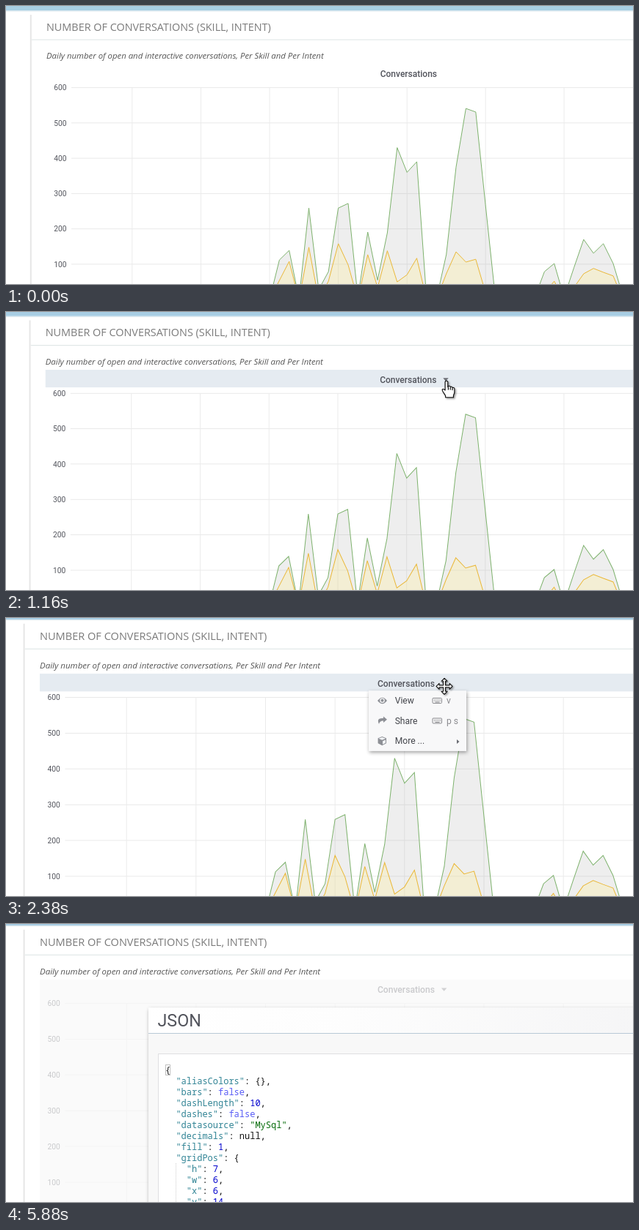
An HTML page for the animation above (5.94 s loop, 854x380 px).

```html
<!DOCTYPE html>
<html lang="en">
<head>
<meta charset="utf-8">
<title>Conversations panel</title>
<style>
html, body { margin: 0; width: 100%; height: 100%; overflow: hidden; background: #fff; }
svg { display: block; width: 100vw; height: 100vh; }
text { font-family: Roboto, sans-serif; fill: #52545c; }
.title { font: 14.4px "Open Sans", sans-serif; fill: #7b7b7b; }
.sub { font: italic 11.39px "Open Sans", sans-serif; fill: #555; }
.head { font-size: 12px; font-weight: 500; }
.axis { font-size: 10.2px; text-anchor: end; }
.tip text { font-size: 11.2px; }
.tip .strong { font-weight: 700; fill: #45474f; }
.item { font-size: 12.1px; fill: #43454b; }
.hint { font-size: 12.1px; fill: #8a8a8e; }
.code { font: 12px "Noto Sans Mono", monospace; fill: #111; }
.key { fill: #318495; }
.num { fill: #0000cd; }
.bool { fill: #585cf6; }
.str { fill: #036a07; }
.cursor { fill: #fff; stroke: #111; stroke-width: 1.1; stroke-linejoin: round; }
</style>
</head>
<body>
<svg id="stage" viewBox="0 0 854 380" preserveAspectRatio="none"></svg>
<script>
const LOOP = 5940;
const DAY = 13.37, X0 = 359, Y0 = 401.2, UNIT = 0.4827;
const GREEN = '#7eb26d', YELLOW = '#eab839', HOT = '#e5ebf1';
const total = [0, 112, 139, 2, 259, 28, 79, 259, 272, 6, 191, 55, 189, 430, 360, 390, 2, 2, 127,
  375, 541, 531, 268, 6, 4, 3, 2, 5, 79, 102, 6, 90, 170, 131, 158, 102, 10, 0];
const active = [0, 54, 108, 0, 148, 0, 52, 158, 98, 0, 127, 34, 138, 50, 70, 117, 0, 0, 73,
  135, 106, 114, 20, 0, 0, 0, 0, 0, 18, 52, 0, 34, 73, 88, 77, 67, 0, 0];

const px = i => X0 + i * DAY;
const py = v => Y0 - v * UNIT;
const rect = (x, y, w, h, fill, more = '') =>
  `<rect x="${x}" y="${y}" width="${w}" height="${h}" fill="${fill}" ${more}/>`;
const text = (x, y, cls, str, more = '') => `<text x="${x}" y="${y}" class="${cls}" ${more}>${str}</text>`;
const line = (x1, y1, x2, y2, stroke, more = '') =>
  `<path d="M${x1} ${y1}L${x2} ${y2}" stroke="${stroke}" fill="none" ${more}/>`;

function series(data, stroke, fill) {
  const pts = data.map((v, i) => px(i).toFixed(1) + ' ' + py(v).toFixed(1)).join('L');
  return `<path d="M${pts}V420H${X0}Z" fill="${fill}"/>` +
    `<path d="M${pts}" fill="none" stroke="${stroke}"/>`;
}

function grid() {
  let out = '';
  for (let v = 100; v <= 600; v += 100) {
    out += line(89, py(v), 870, py(v), '#e9e9e9') + text(82.5, py(v) + 3.7, 'axis', v);
  }
  for (const day of [-14, -7, 0, 7, 14, 22, 30]) out += line(px(day), 111.5, px(day), 420, '#ebebeb');
  return out;
}

const page = () =>
  rect(-10, -10, 890, 16.3, '#a8cee4') + rect(-10, 6.3, 890, 1.2, '#dbe8ee') +
  rect(32.8, 12, 2, 400, '#e6e6e6') + rect(35, 45.6, 840, 1, '#dce4e4') +
  text(55, 33.7, 'title', 'NUMBER OF CONVERSATIONS (SKILL, INTENT)') +
  text(55, 72.4, 'sub', 'Daily number of open and interactive conversations, Per Skill and Per Intent') +
  rect(55, 79.5, 830, 24, HOT, 'id="bar"') +
  text(509.7, 97, 'head', 'Conversations') +
  '<path id="caret" d="M595.7 90.8h7.4l-3.7 4.2z" fill="#6b6d74"/>' +
  grid() + series(total, GREEN, 'rgba(120,120,120,.125)') + series(active, YELLOW, 'rgba(252,236,160,.34)');

const hover = () => `<g id="hover">
  <path id="rule" d="M0 111V420" stroke="#c0504a" stroke-opacity=".8" stroke-width="1.5"/>
  <circle id="dotA" r="4.6" fill="none" stroke="${GREEN}" stroke-opacity=".6" stroke-width="2.4"/>
  <circle id="dotB" r="4.6" fill="none" stroke="${YELLOW}" stroke-opacity=".7" stroke-width="2.4"/>
  <g id="tip" class="tip">${rect(0, 0, 197, 67, '#dbe4ee', 'rx="4"')}
  ${text(98.5, 20, 'strong', '', 'id="date" text-anchor="middle"')}
  ${rect(11, 33, 10, 3, GREEN, 'rx="1"')}${text(23, 38.5, '', 'Conversations:')}
  ${text(188, 38.5, 'strong', '', 'id="valA" text-anchor="end"')}
  ${rect(11, 48, 10, 3, YELLOW, 'rx="1"')}${text(23, 53.5, '', 'Interactive Conversations:')}
  ${text(188, 53.5, 'strong', '', 'id="valB" text-anchor="end"')}</g></g>`;

const ROW = 27.5, MENU_X = 494, MENU_Y = 99.3;
const rowY = i => MENU_Y + i * ROW;
const keyboard = y => `<g transform="translate(580.5 ${y})" fill="none" stroke="#8a8a8e">
  <rect x=".5" y=".5" width="12.5" height="7" rx="1"/>
  <path d="M2.5 2.7h9M2.5 4.3h9" stroke-dasharray="1 1"/><path d="M4 6h6"/></g>`;
const icons = `<g fill="#8d8f95">
  <path d="M506 113q6.5-8.5 13 0q-6.5 8.5-13 0z"/>
  <circle cx="512.5" cy="112.8" r="3.3" fill="#f8f8f9"/><circle cx="512.5" cy="112.8" r="2"/>
  <path d="M514 134.5l5 4.3-5 4.3v-2.6q-5-.2-6 4.5q-4-8.3 6-8z"/>
  <path d="M512.3 162l5.7 2.3v7l-5.7 2.9-5.7-2.9v-7z"/>
  <path d="M507.5 164.8l4.8 2 4.8-2-4.8-1.8zM513 168.2l4-1.7v4.3l-4 2z" fill="#f0f2f4"/></g>`;

const menu = () => `<g id="menu">
  <g id="sub">${rect(627, rowY(2), 131, 81.5, '#f8f8f9', 'filter="url(#drop)" rx="2"')}
  ${rect(627, rowY(2), 131, ROW, HOT, 'id="subHot"')}
  ${['Panel JSON', 'Export CSV', 'Toggle legend'].map((s, i) => text(647, rowY(i + 2) + 17.5, 'item', s)).join('')}</g>
  ${rect(MENU_X, MENU_Y, 133, ROW * 3, '#f8f8f9', 'filter="url(#drop)"')}
  ${rect(MENU_X, MENU_Y, 133, ROW, HOT, 'id="hot"')}
  ${icons}
  ${['View', 'Share', 'More ...'].map((s, i) => text(529.7, rowY(i) + 18, 'item', s)).join('')}
  ${keyboard(109)}${text(600, 117.3, 'hint', 'v')}${keyboard(136.5)}${text(600, 144.8, 'hint', 'p s')}
  <path d="M614 166v6l3.5-3z" fill="#6b6d74"/>
  ${rect(0, 0, 2, ROW, 'url(#flame)', 'id="mark"')}</g>`;

const tok = (cls, s) => `<tspan class="${cls}">${s}</tspan>`;
function codeLines() {
  const rows = [
    [2, 'aliasColors', '{},'], [2, 'bars', tok('bool', 'false') + ','], [2, 'dashLength', tok('num', 10) + ','],
    [2, 'dashes', tok('bool', 'false') + ','], [2, 'datasource', tok('str', '"MySql"') + ','],
    [2, 'decimals', 'null,'], [2, 'fill', tok('num', 1) + ','], [2, 'gridPos', '{'],
    [4, 'h', tok('num', 7) + ','], [4, 'w', tok('num', 6) + ','], [4, 'x', tok('num', 6) + ','],
    [4, 'y', tok('num', 14)]
  ];
  return text(217, 204, 'code', '{') + rows.map(([indent, key, val], i) =>
    text(217 + indent * 7.2, 219 + i * 15, 'code', tok('key', `"${key}"`) + ': ' + val)).join('');
}

const modal = () => `<g id="modal">
  ${rect(46, 76, 820, 310, '#f9f9f9', 'opacity=".72"')}
  ${rect(194, 114.5, 690, 290, '#f8f8f8', 'filter="url(#drop)" rx="2"')}
  ${rect(194, 114.5, 690, 35, 'url(#sheen)')}
  ${rect(194, 149, 690, 1, '#b9c9d6')}
  ${text(206.5, 140, '', 'JSON', 'font-size="23.3"')}
  ${rect(207.5, 177.5, 690, 240, '#fff', 'stroke="#dedfe1"')}
  ${rect(217.5, 192.5, 6, 14, 'none', 'stroke="#c0c0c0"')}
  ${line(231.5, 327, 231.5, 380, '#cfcfcf', 'stroke-dasharray="1 1"')}
  ${codeLines()}</g>`;

const cursors = `<g id="pointer">
  <path id="cross" d="M-14 1H13M0-13V14" stroke="#000" stroke-width="2"/>
  <path id="hand" class="cursor" filter="url(#soft)" transform="translate(.5 -.5) scale(1.08 1.02)"
    d="M-2 1.5C-2-.7 1.4-.7 1.4 1.5V8l.6-.9c1-.7 2.5-.3 2.6 1
    1-.7 2.5-.2 2.6 1.1 1-.6 2.6-.1 2.6 1.3V15c0 2-1 3-1.3 4.5V22H-1.5V20C-2 18-5 15-5.5 12.5-6 10.5-4 10-2 12.5Z
    M2 8v4M4.6 8.5v3.5M7.2 9.5v3"/>
  <path id="move" class="cursor" filter="url(#soft)" d="M0-11l4 4h-2.6v5.6H7V-4l4 4-4 4V1.4H1.4V7H4L0 11-4 7h2.6V1.4H-7V4l-4-4 4-4v2.6h5.6V-7H-4Z"/>
  <path id="arrow" class="cursor" filter="url(#soft)" d="M0 0V16l4-3.6 2.7 6.2 2.8-1.2-2.7-6h5.2Z"/></g>`;

const stage = document.getElementById('stage');
stage.innerHTML = `<defs>
  <filter id="drop" x="-10%" y="-10%" width="120%" height="125%">
    <feDropShadow dx="1" dy="2" stdDeviation="2.5" flood-color="#000" flood-opacity=".38"/></filter>
  <filter id="soft" x="-40%" y="-40%" width="200%" height="200%">
    <feDropShadow dx="1.5" dy="1.5" stdDeviation="1" flood-color="#000" flood-opacity=".4"/></filter>
  <linearGradient id="flame" x2="0" y2="1"><stop stop-color="#fbb034"/><stop offset="1" stop-color="#f05a28"/></linearGradient>
  <linearGradient id="sheen"><stop stop-color="#fff"/><stop offset=".4" stop-color="#fdfdfd"/>
    <stop offset="1" stop-color="#f5f5f6"/></linearGradient></defs>
  <rect width="854" height="380" fill="#fff"/>
  <g id="scene">${page()}${hover()}</g>${menu()}${modal()}${cursors}`;

const el = {};
for (const node of stage.querySelectorAll('[id]')) el[node.id] = node;
const show = (id, on) => { el[id].style.display = on ? '' : 'none'; };
const place = (id, x, y) => el[id].setAttribute('transform', `translate(${x} ${y})`);
const clamp = u => Math.min(1, Math.max(0, u));
const smooth = u => u * u * (3 - 2 * u);

// time, x, y of the pointer's hot spot
const path = [[530, 380, 400], [980, 585, 110], [1100, 600, 95], [1850, 597, 92], [2380, 597, 93],
  [2620, 613, 171], [3150, 613, 171], [3330, 702, 171]];

function pointerAt(t) {
  if (t >= 4190) {
    const u = clamp((t - 5560) / 320) ** 1.3;
    return [700.5 + 124 * u, 170.5 + 212 * u];
  }
  const k = path.findIndex(p => p[0] > t);
  if (k < 0) return path[path.length - 1].slice(1);
  if (k === 0) return path[0].slice(1);
  const [ta, xa, ya] = path[k - 1], [tb, xb, yb] = path[k];
  const u = (t - ta) / (tb - ta);
  return [xa + (xb - xa) * u, ya + (yb - ya) * u];
}

function drawHover(t) {
  const [x, y] = pointerAt(t - 60);
  const i = Math.max(0, Math.floor((x - X0) / DAY));
  const date = new Date(Date.UTC(2018, 1, 22 + i)).toISOString().slice(0, 10);
  place('rule', x, 0);
  place('dotA', px(i), py(total[i]));
  place('dotB', px(i), py(active[i]));
  place('tip', x + 24.5, y - 33.5);
  el.date.textContent = date + ' 00:00:00';
  el.valA.textContent = total[i];
  el.valB.textContent = active[i];
}

function draw(t) {
  const z = smooth(clamp((t - 950) / 900));
  el.scene.setAttribute('transform', `matrix(${1 + .0114 * z} 0 0 ${1 + .0124 * z} ${-9.6 * z} ${-4.4 * z})`);

  const [x, y] = pointerAt(t);
  const inChart = t >= 530 && t < 1100 && y >= 104;
  const modalOn = t >= 4190;
  const menuOn = t >= 2380 && !modalOn;
  show('hover', inChart);
  if (inChart) drawHover(t);
  show('caret', t >= 560);
  show('bar', t >= 980 && !inChart && !modalOn);

  show('menu', menuOn);
  if (menuOn) {
    const row = Math.floor((y - MENU_Y) / ROW);
    const inSub = x > 627;
    show('hot', row >= 0);
    show('sub', row === 2);
    show('subHot', inSub);
    show('mark', row >= 0);
    el.hot.setAttribute('y', rowY(row));
    place('mark', inSub ? 626 : MENU_X, rowY(row));
  }

  show('modal', modalOn);
  el.modal.setAttribute('opacity', clamp((t - 4130) / 250));

  const kind = t < 530 || t >= 5880 ? '' : modalOn ? 'arrow' : inChart ? 'cross' : t >= 2380 && t < 2430 ? 'move' : 'hand';
  for (const id of ['cross', 'hand', 'move', 'arrow']) show(id, id === kind);
  place('pointer', x, y);
}

const start = performance.now();
function tick() {
  draw((performance.now() - start) % LOOP);
  requestAnimationFrame(tick);
}
tick();
</script>
</body>
</html>
```
